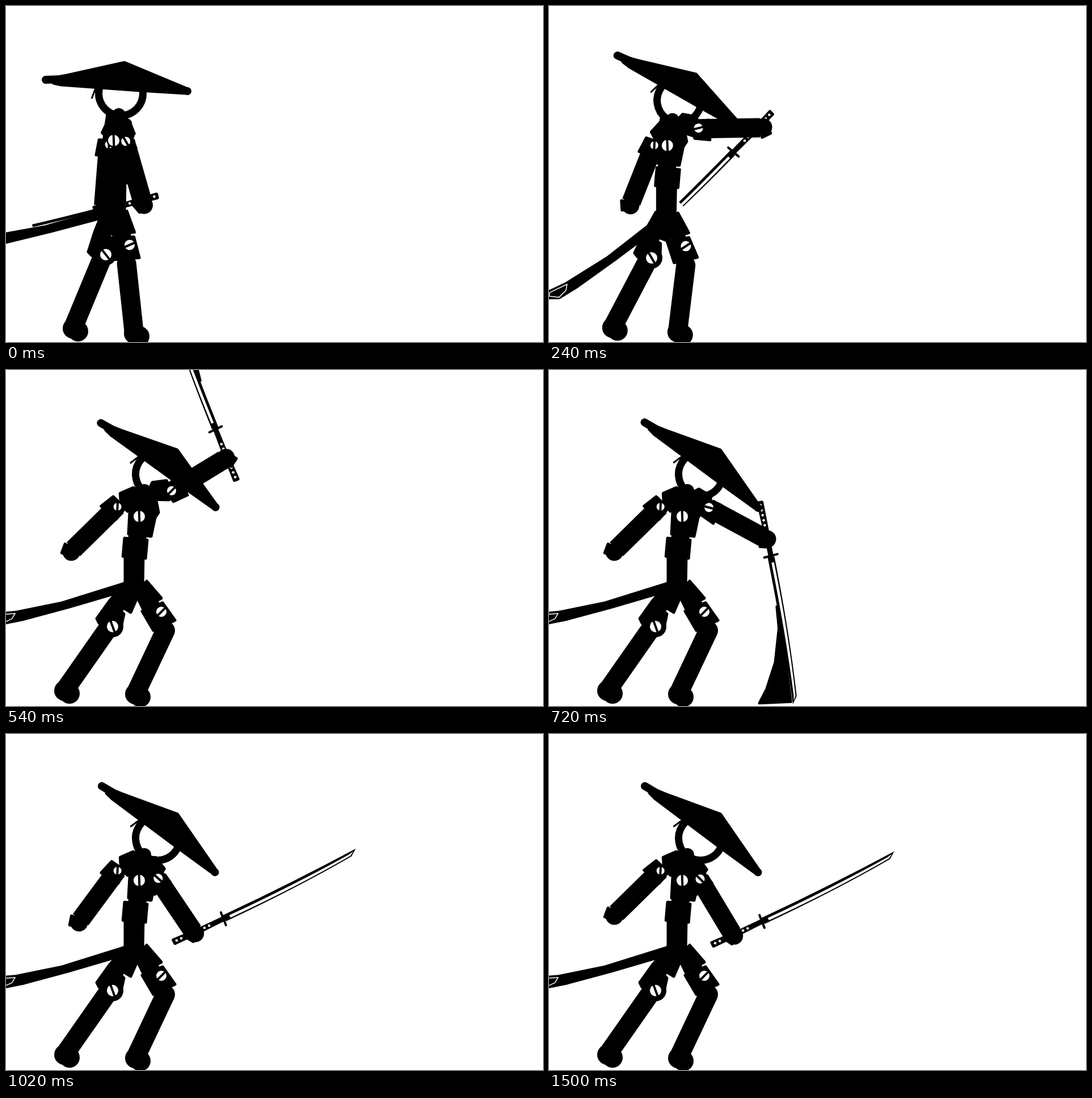
Write an HTML page with a canvas that moves like this. It is 947 px wide and 592 px high and loops after 1980 ms.

```html
<!DOCTYPE html>
<html lang="en">
<head>
<meta charset="utf-8">
<title>Swordsman</title>
<style>
  html, body { margin: 0; width: 100%; height: 100%; overflow: hidden; background: #fff; }
  canvas { display: block; }
</style>
</head>
<body>
<canvas id="stage" width="947" height="592"></canvas>
<script>
const ctx = document.getElementById('stage').getContext('2d');
const LOOP = 1980, STEP = 60, LAST = 25;
const DRAWN = 4, RAISED = 7, LANDED = 17; // steps at which the moves turn

const rad = deg => deg * Math.PI / 180;
const mix = (a, b, u) => a + (b - a) * u;
const ease = u => {
  u = Math.min(1, Math.max(0, u));
  return u * u * (3 - 2 * u);
};
const bump = (f, center, width) => 1 - ease(Math.abs(f - center) / width);

// Point at an offset from (x, y), turned by an angle.
function offset([x, y], deg, dx, dy = 0) {
  const c = Math.cos(rad(deg)), s = Math.sin(rad(deg));
  return [x + dx * c - dy * s, y + dx * s + dy * c];
}

function pose(f) {
  const lean = ease(f / 9);
  const move = (x0, y0, x1, y1) => [mix(x0, x1, lean), mix(y0, y1, lean)];
  const neck = move(199, 192, 244, 213);

  const lift = mix(94.5, 135.5, lean);
  const dip = bump(f, LANDED, 5);
  const shoulderL = offset(neck, lift + 14, 55);

  // The sword arm goes up with the draw, then falls to rest.
  const raise = ease(f / RAISED), fall = ease((f - RAISED) / 7.7);
  const armR = mix(mix(74, -49.5, raise), 59, fall) - 3 * dip;
  const shoulderR = offset(neck, 18 + 0.64 * armR + 0.0018 * armR ** 2, 48);
  const reach = 117 - 7 * bump(f, RAISED, 5);
  const hand = offset(shoulderR, armR, reach);

  // One and a half turns follow the draw.
  const turn = Math.min(1, Math.max(0, (f - DRAWN) / 10.5));
  const spin = mix(turn, ease(turn), 0.36);
  const sword = mix(mix(166.6, 135.5, ease(f / DRAWN)), -386.4, spin);
  const grip = mix(70, 55, ease(f / 20)) - 30 * bump(f, 12, 5);
  const guard = offset(hand, sword, grip, mix(8, -1, ease(f / 12)));

  const tug = bump(f, DRAWN, 4.6);
  const [sx, sy] = move(-15, 402, 16, 429);
  return {
    neck, shoulderL, shoulderR, armR, reach, sword, guard,
    armL: lift - 9 * dip,
    head: move(202.5, 154, 267.5, 183.5),
    tilt: 32.7 * (1 - 0.68 ** f),
    chest: [neck[0] - 9, neck[1] + 45],
    waist: move(194, 335, 226, 355),
    kneeL: move(176, 438, 188, 452),
    kneeR: move(218, 421, 274, 426),
    thighL: mix(-18, 0, lean),
    thighR: mix(21, 0, lean),
    ankleL: move(118, 568, 103, 565),
    ankleR: move(226, 577, 228, 571),
    sheath: [sx + 34 * tug, sy + 77 * tug],
    sheathAngle: mix(-13.4, -15.8, lean) - 22 * tug
  };
}

function at([x, y], deg, draw) {
  ctx.save();
  ctx.translate(x, y);
  ctx.rotate(rad(deg));
  draw();
  ctx.restore();
}

function trace(...p) {
  ctx.beginPath();
  for (let i = 0; i < p.length; i += 2) ctx.lineTo(p[i], p[i + 1]);
}

function poly(...p) {
  trace(...p);
  ctx.closePath();
  ctx.lineWidth = 5;
  ctx.fill();
  ctx.stroke();
}

function line(width, ...p) {
  trace(...p);
  ctx.lineWidth = width;
  ctx.stroke();
}

function disc(x, y, r, color = '#000') {
  ctx.fillStyle = color;
  ctx.beginPath();
  ctx.arc(x, y, r, 0, 7);
  ctx.fill();
  ctx.fillStyle = '#000';
}

function screw(point, r, deg) {
  at(point, deg, () => {
    disc(0, 0, r + 2.5);
    disc(0, 0, r, '#fff');
    line(4, -r, 0, r, 0);
  });
}

function drawHead(p) {
  at(p.head, p.tilt, () => {
    ctx.lineWidth = 13;
    ctx.beginPath();
    ctx.arc(0, 0, 39, 0, 7);
    ctx.stroke();
    line(14, -132.5, -24, -105, -25);
    disc(117.5, -4, 7);
    poly(-122, -27, -95, -32, 6.5, -54.5, 118, -8, 116, 0, 33, -5, -105, -15, -119, -18);
    line(3, -45, -8, -51, 8);
  });
}

function drawArm(shoulder, deg, length) {
  at(shoulder, deg, () => {
    ctx.fillRect(0, -16, length - 6, 34);
    disc(length, 0, 15.5);
    poly(-7, 18, 20, 21, 17, -14, -8, -11);
    poly(108, 0, 112, 18, 127, 11, 122, 0);
  });
}

function drawShoulder(neck, [x, y], side) {
  const deg = Math.atan2(y - neck[1], x - neck[0]) * 180 / Math.PI;
  at(neck, deg, () => {
    ctx.scale(1, side);
    poly(14, 15, 39, 18, 48, 0, 44, -16, 0, -15);
  });
}

function drawLeg(top, [x, y]) {
  line(34, ...top, x, y);
  disc(x, y, 18);
  disc(x + 9, y + 5, 18);
}

function drawLegs(p) {
  drawLeg(offset(p.kneeL, p.thighL, -10, 6), p.ankleL);
  drawLeg(offset(p.kneeR, p.thighR, 7, 33), p.ankleR);
  at(p.kneeL, p.thighL, () => {
    poly(22, -78, -4, -47, 32, -25, 45, -55);
    poly(-5, -46, -28, -14, -24, -6, 14, 6, 20, -22);
    line(24, 24, -60, 0, -20);
    disc(0, 0, 19);
  });
  at(p.kneeR, p.thighR, () => {
    poly(-26, -54, 0, -24, -33, -6, -45, -31);
    poly(2, -16, 24, 15, -14, 33, -34, -1);
    line(24, -26, -34, -12, -6);
  });
  screw(p.kneeL, 10, 70 + p.thighL);
  screw(p.kneeR, 9, -45 + p.thighR);
}

function drawTorso({ neck, chest, waist }) {
  disc(...neck, 12);
  at(chest, 0, () => poly(-11, -47, 29, -33, 34, -7, 28, 2, 21, 35, -19, 31, -17, -5));
  at(waist, 5, () => poly(-22, -57, 18, -57, 18, -25, -22, -25));
  at(waist, 0, () => poly(-16, -28, 16, -28, 15, 27, -16, 27));
  line(32, ...chest, ...waist, waist[0] + 1, waist[1] + 34);
}

function drawSheath(p) {
  at(p.sheath, p.sheathAngle, () => {
    poly(-46, -11, 0, -2, 85, 4.5, 215, 1, 215, 14, 93, 15, 13, 14, -25, 11, -42, -1);
    ctx.strokeStyle = '#fff';
    line(1.5, 0, 0, -33, -6.5, -38, -2, -25, 10, -8, 7.5, 0, 0);
    ctx.strokeStyle = '#000';
  });
}

function drawBlade() {
  ctx.beginPath();
  ctx.moveTo(2, -6);
  ctx.quadraticCurveTo(140, -3, 264, -7);
  ctx.lineTo(251, 2);
  ctx.quadraticCurveTo(140, 9, 2, 6);
  ctx.fill();
  ctx.fillStyle = '#fff';
  ctx.beginPath();
  ctx.moveTo(12, -1);
  ctx.quadraticCurveTo(140, 2, 249, -3);
  ctx.lineTo(258, -4.5);
  ctx.lineTo(250, 0);
  ctx.quadraticCurveTo(140, 7, 12, 3.5);
  ctx.fill();
  ctx.fillStyle = '#000';
}

function drawSword(p, f) {
  at(p.guard, p.sword, () => {
    if (f < 15) ctx.scale(1, -1);
    poly(-96, -6, -96, 1, -40, 2, 0, 2, 0, -2, -40, -3);
    for (let d = -91; d < -24; d += 9) {
      at([d, -2.5 + (d + 91) / 30], 45, () => {
        ctx.fillStyle = '#fff';
        ctx.fillRect(-2, -2, 4, 4);
      });
    }
    line(4, 1, -12, -1, 12);
    if (f <= DRAWN) { // the rest is still in the sheath
      ctx.beginPath();
      ctx.rect(0, -20, 130, 40);
      ctx.clip();
    }
    drawBlade();
    if (f > DRAWN && f < 14) {
      const k = 1 - (f - RAISED) * 0.04;
      poly(90, -5, 128, -10 * k, 186, -31 * k, 230, -60 * k, 252, -81 * k, 259, -10, 140, -5);
    }
  });
}

function drawSparks(f) {
  if (f < 20 || f > 23) return;
  const drift = Math.max(0, f - 21) * 14;
  ctx.strokeStyle = '#0ff';
  at([drift, -drift / 2], 0, () => {
    line(8, 384, 331, 440, 296, 491, 259);
    line(8, 440, 296, 487, 292);
    if (f === 20) return;
    line(8, 491, 259, 511, 253, 528, 232);
    line(8, 487, 292, 517, 314, 551, 314, 567, 325);
    line(8, 517, 314, 511, 332, 491, 337);
  });
}

function render(f) {
  const p = pose(f);
  ctx.fillStyle = '#fff';
  ctx.fillRect(0, 0, 947, 592);
  ctx.fillStyle = ctx.strokeStyle = '#000';
  ctx.lineJoin = ctx.lineCap = 'round';

  drawSword(p, f);
  drawSheath(p);
  drawLegs(p);
  drawTorso(p);
  drawShoulder(p.neck, p.shoulderL, 1);
  drawShoulder(p.neck, p.shoulderR, -1);
  drawArm(p.shoulderL, p.armL, 114);
  drawArm(p.shoulderR, p.armR, p.reach);
  drawHead(p);
  screw(p.shoulderL, 7, 93);
  screw(p.shoulderR, 8, p.armR - 14);
  screw(p.chest, 10, 88);
  drawSparks(f);
}

function tick() {
  render(Math.min(LAST, Math.floor(performance.now() % LOOP / STEP)));
  requestAnimationFrame(tick);
}
tick();
</script>
</body>
</html>
```
